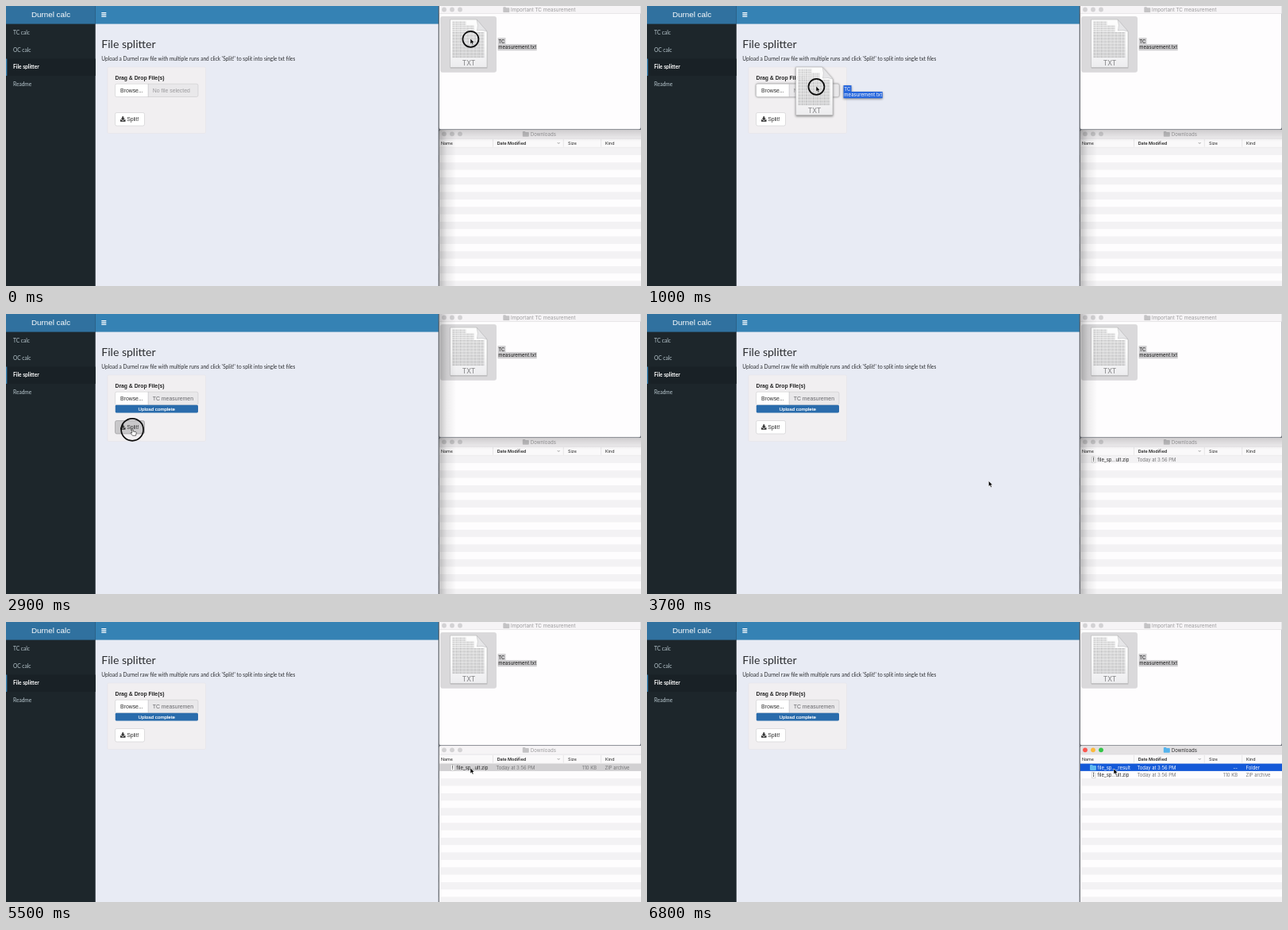
An HTML page for the animation above (6.9 s loop, 800 px wide and 353 px high).

```html
<!DOCTYPE html>
<html lang="en">
<head>
<meta charset="utf-8">
<title>File splitter</title>
<style>
  html, body { margin: 0; height: 100%; overflow: hidden; }
  svg { display: block; }
  #stage { width: 100vw; height: 100vh; }
  text { white-space: pre; }
  .lato { font-family: Lato, sans-serif; }
  .arial { font: 6.88px "Liberation Sans", Arial, sans-serif; }
  .mac { font: 5.9px Inter, sans-serif; }
  .mid { text-anchor: middle; }
  .end { text-anchor: end; }
  .head { font-size: 5.4px; fill: #222; }
  .label { --mark: #d0cfd1; fill: #111; }
  #drag { --mark: #1d60dc; fill: #fff; filter: drop-shadow(0 1px 1.8px #0007); }
  .win { --bar: #f6f4f6; --red: #d3d2d4; --amber: #d3d2d4; --green: #d3d2d4; --folder: #c4c3c5; --title: #9b9a9c; }
  .win.active { --bar: #e3e1e3; --red: #fb5750; --amber: #fbb93c; --green: #34c548; --folder: #55b3ec; --title: #2c2c2c; }
  .grey { fill: #747476; }
  .picked, .picked .grey { fill: #fff; }
</style>
</head>
<body>
<svg id="stage" viewBox="0 0 800 353" preserveAspectRatio="none">
  <defs>
    <linearGradient id="fadeRight">
      <stop stop-color="#000" stop-opacity=".24"/>
      <stop offset=".45" stop-color="#000" stop-opacity=".07"/>
      <stop offset="1" stop-color="#000" stop-opacity="0"/>
    </linearGradient>
    <linearGradient id="fadeDown" x2="0" y2="1">
      <stop stop-color="#000" stop-opacity=".16"/>
      <stop offset="1" stop-color="#000" stop-opacity="0"/>
    </linearGradient>
    <linearGradient id="paper" x2="0" y2="1">
      <stop offset=".5" stop-color="#fcfcfc"/>
      <stop offset="1" stop-color="#ececee"/>
    </linearGradient>
    <path id="folder" d="M0 1 Q0 0 1 0 H3 L3.8 1 H7.2 Q8 1 8 1.8 V6 Q8 6.8 7.2 6.8 H.8 Q0 6.8 0 6Z"/>
    <g id="lights">
      <circle cx="552" r="2.9" fill="var(--red)"/>
      <circle cx="562" r="2.9" fill="var(--amber)"/>
      <circle cx="572" r="2.9" fill="var(--green)"/>
    </g>
    <g id="file">
      <path d="M559.5 17 H593 L606 32 V78 H559.5Z" fill="#888" opacity=".35" transform="translate(.3 .8)"/>
      <path d="M559.5 17 H593 L606 32 V77.5 H559.5Z" fill="url(#paper)" stroke="#b5b5b7" stroke-width=".6"/>
      <path id="print" fill="none" stroke="#a6a6a8" stroke-width=".7" stroke-dasharray="2.3 .5 1.4 .4"/>
      <path d="M593 17 Q595.5 25 593.5 31 Q600 29.5 606 32Z" fill="#e6e6e8" stroke="#b5b5b7" stroke-width=".5"/>
      <text class="mac mid" x="583" y="74.5" style="font-size:8.6px" fill="#828284">TXT</text>
      <path d="M619.5 40 H629.5 V48 H668.7 V56.3 H619.5Z" fill="var(--mark)"/>
      <g class="mac" style="font-size:6px">
        <text x="620.3" y="46.5">TC</text>
        <text x="620.3" y="54.3">measurement.txt</text>
      </g>
    </g>
  </defs>

  <!-- web page -->
  <rect width="546" height="353" fill="#e8ebf4"/>
  <rect width="546" height="22.6" fill="#3582b4"/>
  <rect width="112.7" height="353" fill="#1d262b"/>
  <rect width="112.7" height="22.6" fill="#30719f"/>
  <rect y="66.5" width="112.7" height="21.5" fill="#192126"/>
  <rect y="66.5" width="1.3" height="21.5" fill="#3582b4"/>
  <path d="M120.3 8.6 h6 m-6 2.3 h6 m-6 2.3 h6" stroke="#fff" stroke-width="1.2"/>
  <text class="arial mid" x="56.5" y="14" style="font-size:9.82px" fill="#fff">Durnel calc</text>
  <g class="lato" font-size="6.6" fill="#b8c7ce">
    <text x="9" y="36.3">TC calc</text>
    <text x="9" y="57.9">OC calc</text>
    <text x="9" y="79.4" font-weight="700" fill="#fff">File splitter</text>
    <text x="9" y="101">Readme</text>
  </g>
  <g class="lato" fill="#2b2d30">
    <text x="120.3" y="53" font-size="14.05">File splitter</text>
    <text x="120.3" y="68.7" font-size="6.57">Upload a Durnel raw file with multiple runs and click 'Split!' to split into single txt files</text>
  </g>
  <rect x="127.8" y="77" width="123.7" height="83.5" rx="1.5" fill="#f1eff1" stroke="#e2e1e5" stroke-width=".5"/>
  <g class="arial" fill="#2e2e2e">
    <text x="137.5" y="93.2" style="font-size:6.8px" font-weight="700" fill="#222">Drag &amp; Drop File(s)</text>
    <g id="input" stroke="#c3c2c5" stroke-width=".5">
      <path d="M179 98.2 H240 Q242 98.2 242 100.2 V112.5 Q242 114.5 240 114.5 H179Z" fill="#e9e8ea"/>
      <path d="M179 98.2 H139.5 Q137.5 98.2 137.5 100.2 V112.5 Q137.5 114.5 139.5 114.5 H179Z" fill="#fff"/>
    </g>
    <text x="144" y="108.7">Browse...</text>
    <text id="chosen" x="184.8" y="108.7"></text>
    <svg id="bar" x="137.5" y="114.4" height="10.4">
      <rect width="100%" height="10.4" rx="1.8" fill="#2a6cac"/>
      <text class="mid" x="50%" y="7.3" style="font-size:6.2px" fill="#fff" stroke="#fff" stroke-width=".15">Upload complete</text>
    </svg>
    <rect id="split" x="137.5" y="134.5" width="37" height="16.5" rx="2" stroke-width=".5"/>
    <path d="M146.3 139.2 h1.9 v2.4 h1.7 l-2.65 2.6 l-2.65 -2.6 h1.7Z M144 143.2 h1.2 l2 1.7 l2 -1.7 h1.3 v2.5 h-6.5Z"/>
    <text x="152.2" y="145.2">Split!</text>
  </g>

  <!-- file windows -->
  <rect x="545" width="255" height="353" fill="#6d7179"/>
  <g class="win mac">
    <path d="M545.7 0 H799.6 V153 Q799.6 155.3 797.3 155.3 H548 Q545.7 155.3 545.7 153Z" fill="#fefdfe"/>
    <rect x="545.7" width="253.9" height="9.7" fill="#f6f4f6"/>
    <rect x="545.7" y="9.5" width="253.9" height=".5" fill="#d8d6d8"/>
    <use href="#lights" y="4.5"/>
    <use href="#folder" x="626.3" y="1.3" fill="var(--folder)"/>
    <text x="636" y="6.9" style="font-size:6.3px" fill="var(--title)">Important TC measurement</text>
    <rect x="547" y="13" width="71" height="70.8" rx="3" fill="#dad9db"/>
    <use class="label" href="#file"/>
  </g>
  <g id="downloads" class="win mac">
    <path d="M545.7 353 V158.5 Q545.7 156.3 548 156.3 H800 V353Z" fill="#fefdfe"/>
    <path d="M545.7 167 V158.5 Q545.7 156.3 548 156.3 H800 V167Z" fill="var(--bar)"/>
    <use href="#lights" y="161.3"/>
    <use href="#folder" x="650.8" y="158" fill="var(--folder)"/>
    <text x="660.8" y="163.7" style="font-size:6.1px" fill="var(--title)">Downloads</text>
    <rect x="545.7" y="167" width="255" height="11.5" fill="#faf9fa"/>
    <path d="M545.7 167.1 H800 M545.7 178.4 H800 M613.5 168 V177.5 M702.3 168 V177.5 M749.7 168 V177.5" stroke="#d3d2d4" stroke-width=".5"/>
    <path d="M694.7 172 l1.5 1.5 l1.5 -1.5" fill="none" stroke="#666" stroke-width=".6"/>
    <text class="head" x="548" y="174.6">Name</text>
    <text class="head" x="618.7" y="174.6" font-weight="600">Date Modified</text>
    <text class="head" x="708" y="174.6">Size</text>
    <text class="head" x="755" y="174.6">Kind</text>
    <path id="stripes" fill="#f3f2f4"/>
    <rect id="pick" x="545.7" y="178.6" width="254.3" height="9.3"/>
    <g id="result" class="picked">
      <use href="#folder" x="558" y="180.1" fill="#5fb9f0"/>
      <text x="567.5" y="185.8">file_sp…_result</text>
      <text class="grey" x="617.5" y="185.8">Today at 3:56 PM</text>
      <text class="grey end" x="744" y="185.8">--</text>
      <text class="grey" x="754.5" y="185.8">Folder</text>
    </g>
    <g id="zip" fill="#222">
      <path d="M560.3 180 h3.3 l1.5 1.5 v5.8 h-4.8Z" fill="#fff" stroke="#a3a3a5" stroke-width=".4"/>
      <path d="M562.6 180.5 v5.2" stroke="#444" stroke-width="1.1" stroke-dasharray="1 .4"/>
      <text x="567.5" y="185.8">file_sp…ult.zip</text>
      <text class="grey" x="617.5" y="185.8">Today at 3:56 PM</text>
      <text id="size" class="grey end" x="744" y="185.8">110 KB</text>
      <text id="kind" class="grey" x="754.5" y="185.8">ZIP archive</text>
    </g>
  </g>
  <!-- shadows of whichever window lies in front -->
  <rect id="shadeTop" x="545.5" width="22" height="155.5" fill="url(#fadeRight)"/>
  <g id="shadeDownloads">
    <rect x="545.5" y="156" width="22" height="197" fill="url(#fadeRight)"/>
    <rect x="545.5" y="156" width="254.5" height="15" fill="url(#fadeDown)"/>
  </g>
  <rect x="544.7" width=".9" height="353" fill="#55585e"/>

  <use id="drag" href="#file" opacity=".95"/>
  <g id="pointer">
    <circle id="ring" cx=".4" cy=".8" fill="none" stroke="#0c0c0c" stroke-width="1.7"/>
    <path id="arrow" d="M0 0 V6.9 L1.6 5.5 L2.8 8.1 L4 7.6 L2.9 5.1 H5Z" stroke="#fff" stroke-width=".5"/>
    <path id="hand" d="M0 .7 Q.7 -.2 1.4 .7 V3 L5 3.7 Q5.7 4 5.5 5 L4.8 8.3 H.8 L-1.7 5.3 Q-1.8 4.2 -.8 4.5 L0 5.2Z" fill="#fff" stroke="#111" stroke-width=".6"/>
  </g>
</svg>
<script>
const LOOP = 6900, STEP = 100, ROW = 9.33;
const $ = id => document.getElementById(id);
const set = (id, attrs) => { for (const k in attrs) $(id).setAttribute(k, attrs[k]); };
const show = (id, on) => { $(id).style.display = on ? '' : 'none'; };
const clamp = v => Math.min(1, Math.max(0, v));

// time, x, y of the pointer tip
const path = [
  [100, 585, 41], [950, 213, 101], [1400, 214, 103], [1700, 212, 105],
  [2200, 158.7, 145], [3100, 158.7, 145], [4100, 578, 246], [4500, 588, 193],
  [4900, 585, 184], [6300, 585, 184], [6700, 588, 185]
];
const presses = [[-200, 1450], [2850, 3050], [4950, 5050], [5150, 5250]];

function pointerAt(t) {
  const i = path.findIndex(p => p[0] > t);
  if (i === 0) return path[0].slice(1);
  if (i < 0) return path[path.length - 1].slice(1);
  const [t0, x0, y0] = path[i - 1], [t1, x1, y1] = path[i];
  const p = (t - t0) / (t1 - t0), e = p * p * (3 - 2 * p);
  return [x0 + (x1 - x0) * e, y0 + (y1 - y0) * e];
}

function drawPrint() {
  let d = '';
  for (let y = 20; y < 32; y += 1.7) d += `M562.5 ${y}h${y > 25 ? 27 : 17}`;
  for (let y = 33.5; y < 65; y += 1.35) d += `M562.5 ${y}h40`;
  set('print', { d });
}

function drawStripes() {
  let d = '';
  for (let y = 178.6; y < 353; y += 2 * ROW) d += `M545.7 ${y}H800v${ROW}H545.7Z`;
  set('stripes', { d });
}

function draw(t) {
  const [x, y] = pointerAt(t);
  const press = presses.find(([a, b]) => t >= a && t < b);
  const overButton = t >= 2200 && t < 3300;
  const dragging = t >= 100 && t < 1450;
  set('pointer', { transform: `translate(${x} ${y})` });
  show('ring', press);
  if (press) set('ring', { r: Math.max(10, 18 - (t - press[0]) * 0.08) });
  show('arrow', !overButton);
  show('hand', overButton);

  show('drag', dragging);
  set('drag', { transform: `translate(${x - 585} ${y - 41})` });
  $('input').style.filter = dragging ? 'drop-shadow(0 0 1.2px #777)' : '';
  $('chosen').textContent = t < 1450 ? 'No file selected' : 'TC measuremen';
  $('chosen').style.fill = t < 1450 ? '#99989b' : '#66666a';
  const left = 1 - clamp((t - 1450) / 600);
  set('bar', { width: 104.5 * (1 - left * left) });
  const pressed = overButton && press;
  set('split', {
    fill: pressed ? '#c9c8ca' : overButton ? '#e4e3e5' : '#fff',
    stroke: pressed ? '#838285' : overButton ? '#aaa' : '#c3c2c5'
  });

  const unzipped = t >= 5900;
  const picked = t >= 5000;
  const active = t >= 4000 && t < 5400 || unzipped;
  $('downloads').classList.toggle('active', active);
  show('shadeTop', t >= 2850 && t < 4000);
  show('shadeDownloads', t < 4000);
  show('pick', picked);
  set('pick', { fill: active ? '#1459d8' : '#d1d0d2' });
  show('result', unzipped);
  show('zip', t >= 3400);
  set('zip', { transform: `translate(0 ${unzipped ? ROW : 0})` });
  $('zip').classList.toggle('picked', picked && active && !unzipped);
  show('size', t >= 4400);
  show('kind', t >= 5000);
}

drawPrint();
drawStripes();
const start = performance.now();
function frame() {
  const t = (performance.now() - start) % LOOP;
  draw(Math.floor(t / STEP) * STEP);
  requestAnimationFrame(frame);
}
frame();
</script>
</body>
</html>
```
